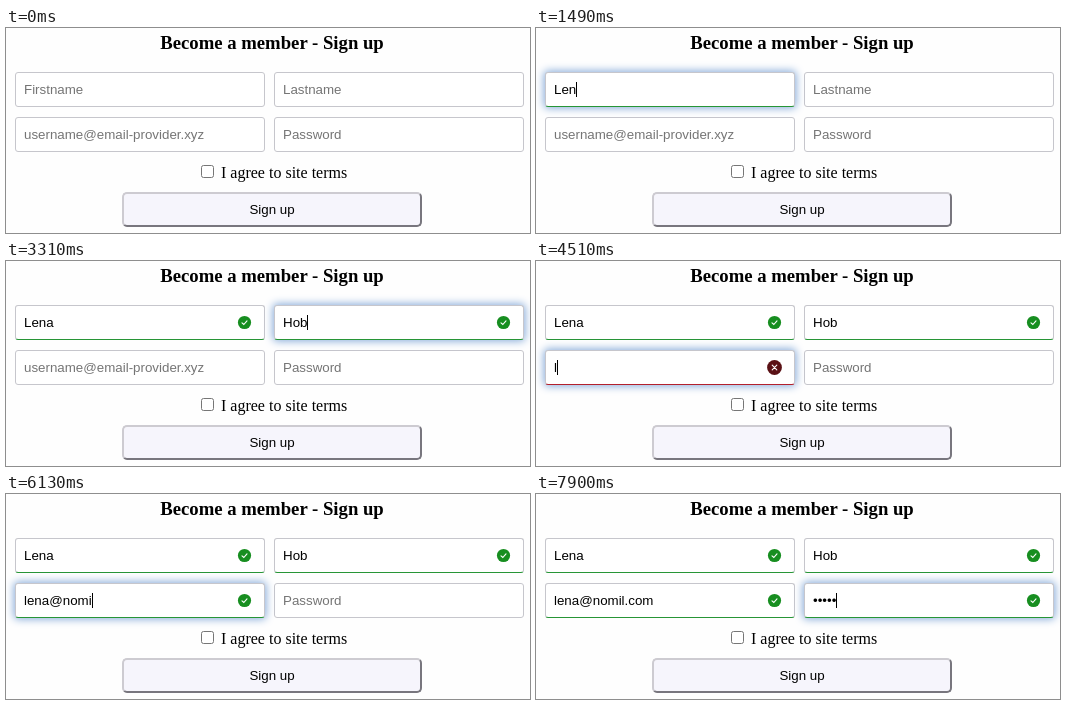
An HTML page that plays this animation: 524 by 205 pixels, repeating every 8000 ms.

```html
<!DOCTYPE html>
<html lang="en">
<head>
<meta charset="utf-8">
<title>Sign up</title>
<style>
html, body { margin: 0; width: 100%; height: 100%; overflow: hidden; background: #fefefe; }
body { position: relative; font: 16px "Liberation Serif", serif; color: #000; }
body > * { position: absolute; box-sizing: border-box; white-space: pre; }
h3 { margin: 0; left: 116px; top: 4px; width: 300px; text-align: center; font-size: 18.72px; line-height: 21px; }
.field, .button { font: 13.333px/33px "Liberation Sans", sans-serif; }
.field { width: 250px; height: 35px; padding-left: 8px; border: 1px solid #c6c6cc; border-radius: 3px; background: #fff; }
.field.focus { box-shadow: 0 0 9px 1px #82a8d8; z-index: 1; }
.hint { color: #757575; }
.caret { display: inline-block; width: 1px; height: 15px; margin-right: -1px; background: #000; vertical-align: -3px; }
.field svg { position: absolute; left: 221px; top: 9px; width: 15px; height: 15px; fill: none; stroke: #fff; stroke-linecap: round; }
.box { left: 195px; top: 137px; width: 13px; height: 13px; border: 1px solid #767676; border-radius: 2.5px; background: #fff; }
.terms { left: 215px; top: 136px; line-height: 18px; }
.button { left: 116px; top: 164px; width: 300px; height: 35px; line-height: 31px; text-align: center;
  border: 2px solid; border-color: #cdcbd1 #78767e #78767e #cdcbd1; border-radius: 5px; background: #f6f5fc; }
</style>
</head>
<body>
<h3>Become a member - Sign up</h3>
<div class="box"></div>
<div class="terms">I agree to site terms</div>
<div class="button">Sign up</div>
<script>
const LOOP = 8000;
const RED = '#b3202c', GREEN = '#279536';
const isEmail = text => /^\w+@\w+(\.\w+)*$/.test(text);

// keys: [time, number of characters typed so far]
const fields = [
  { x: 9, y: 44, hint: 'Firstname', value: 'Lena', focus: 700, iconFrom: 1790,
    keys: [[1210, 1], [1290, 2], [1490, 3], [1600, 4]] },
  { x: 268, y: 44, hint: 'Lastname', value: 'Hob', focus: 2310,
    keys: [[3020, 1], [3120, 2], [3310, 3]] },
  { x: 9, y: 89, hint: 'username@email-provider.xyz', value: 'lena@nomil.com', focus: 3740, valid: isEmail,
    keys: [[4510, 1], [4730, 2], [4820, 3], [5120, 4], [5520, 5], [5820, 6], [5920, 7],
           [6030, 8], [6130, 9], [6330, 10], [6530, 11], [6720, 13], [6820, 14]] },
  { x: 268, y: 89, hint: 'Password', value: '•••••', focus: 7220,
    keys: [[7510, 1], [7610, 2], [7800, 4], [7900, 5]] }
];
const caretHidden = [[2200, 2310], [2820, 3020], [4310, 4510]];

for (const field of fields) {
  field.el = document.createElement('div');
  field.el.style.cssText = `left:${field.x}px;top:${field.y}px`;
  document.body.append(field.el);
}

function icon(valid, t) {
  const [radius, color, path] = valid
    ? [6.6, t < 3020 ? '#1d6427' : '#178e20', 'M5 7.8 6.8 9.5 10 5.8']
    : [7.4, '#5a1115', 'M5.2 5.2 9.8 9.8M9.8 5.2 5.2 9.8'];
  return `<svg viewBox="0 0 15 15"><circle cx="7.5" cy="7.5" r="${radius}" fill="${color}" stroke="none"/>` +
    `<path d="${path}" stroke-width="1.1"/></svg>`;
}

function draw(t) {
  const active = fields.findLast(f => f.focus <= t);
  const blinkOn = !caretHidden.some(([from, to]) => t >= from && t < to);
  for (const field of fields) {
    const key = field.keys.findLast(([time]) => time <= t);
    const text = key ? field.value.slice(0, key[1]) : '';
    const valid = field.valid ? field.valid(text) : true;
    const caret = field === active && blinkOn ? '<span class="caret"></span>' : '';
    let html = text + caret;
    if (!text) html += `<span class="hint">${field.hint}</span>`;
    else if (t >= (field.iconFrom || 0)) html += icon(valid, t);
    if (html !== field.html) field.el.innerHTML = field.html = html;
    if (field.html.includes('<svg') && field.tone !== (t < 3020)) {
      field.tone = t < 3020;
    }
    field.el.className = field === active ? 'field focus' : 'field';
    field.el.style.borderBottomColor = text ? (valid ? GREEN : RED) : '';
  }
}

const start = performance.now();
function tick() {
  draw((performance.now() - start) % LOOP);
  requestAnimationFrame(tick);
}
tick();
</script>
</body>
</html>
```
